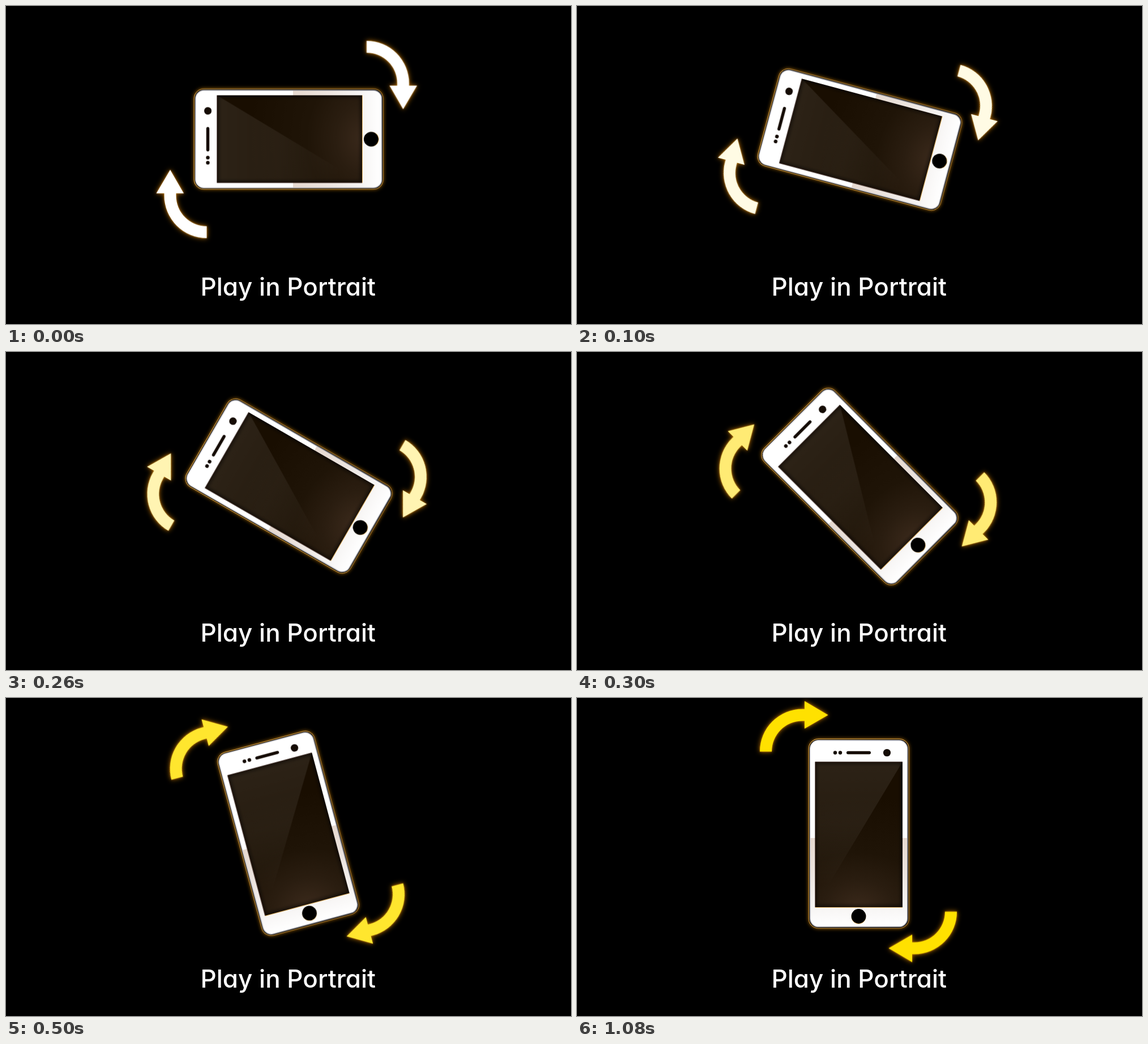
Write an HTML page that moves like this. It is 998x561 px and loops after 1.4 s.

```html
<!DOCTYPE html>
<html lang="en">
<head>
<meta charset="utf-8">
<title>Play in Portrait</title>
<style>
  html, body { margin: 0; width: 100%; height: 100%; overflow: hidden; background: #000; }
  svg { display: block; width: 100%; height: 100%; }
  #turner { transform-box: view-box; transform-origin: 496.25px 236.25px; }
  .arrow { filter: drop-shadow(0 0 1.5px #b87408) drop-shadow(0 0 4px #9a5e00); }
  .rim { filter: drop-shadow(0 0 3px #9a6000); }
  text {
    font: 450 44px Inter, "Open Sans", sans-serif;
    font-feature-settings: "cv11";
    text-anchor: middle;
    fill: #fff;
  }
</style>
</head>
<body>
<svg viewBox="0 0 998 561">
  <defs>
    <linearGradient id="casing" gradientUnits="userSpaceOnUse" x1="0" y1="75" x2="0" y2="403">
      <stop offset="0" stop-color="#fff"/>
      <stop offset=".524" stop-color="#fff"/>
      <stop offset=".524" stop-color="#e6d9d0"/>
      <stop offset=".7" stop-color="#ece4df"/>
      <stop offset=".9" stop-color="#f7f5f4"/>
      <stop offset="1" stop-color="#fff"/>
    </linearGradient>
    <linearGradient id="edge" x1="0" y1="0" x2="1" y2="1">
      <stop offset="0" stop-color="#dedbdc"/>
      <stop offset="1" stop-color="#85858d"/>
    </linearGradient>
    <linearGradient id="gold" x1="0" y1="0" x2="1" y2="1">
      <stop offset="0" stop-color="#dca850"/>
      <stop offset="1" stop-color="#b58234"/>
    </linearGradient>
    <radialGradient id="glass" gradientUnits="userSpaceOnUse" cx="498" cy="372" r="250"
                    gradientTransform="translate(0 74.4) scale(1 .8)">
      <stop offset="0" stop-color="#3a291b"/>
      <stop offset=".25" stop-color="#2a1d10"/>
      <stop offset=".5" stop-color="#1f1407"/>
      <stop offset="1" stop-color="#190e01"/>
    </radialGradient>
    <linearGradient id="gloss" gradientUnits="userSpaceOnUse" x1="0" y1="112" x2="0" y2="330">
      <stop offset="0" stop-color="#fff" stop-opacity=".085"/>
      <stop offset=".5" stop-color="#fff" stop-opacity=".06"/>
      <stop offset="1" stop-color="#fff" stop-opacity="0"/>
    </linearGradient>
    <filter id="soft"><feGaussianBlur stdDeviation="3"/></filter>
    <clipPath id="screen"><rect x="420.5" y="112.5" width="154.5" height="256.5"/></clipPath>
    <path id="arrow" d="M323 94.5A75 75 0 0 1 398 19.5H402V5.5L443.5 30L402 54V40.5H398A54 54 0 0 0 344 94.5Z"/>
  </defs>

  <g id="turner">
    <g id="arrows" fill="#fff">
      <use class="arrow" href="#arrow"/>
      <use class="arrow" href="#arrow" transform="rotate(180 497 235.75)"/>
    </g>

    <rect class="rim" x="409.4" y="72.4" width="176.8" height="333.8" rx="17" stroke="url(#gold)" stroke-width="1.1"/>
    <rect x="411.8" y="74.8" width="172" height="329" rx="15" fill="url(#casing)" stroke="url(#edge)" stroke-width="1.5"/>

    <g clip-path="url(#screen)">
      <rect x="420" y="112" width="156" height="258" fill="url(#glass)"/>
      <path d="M420.5 112.5H575L420.5 369Z" fill="url(#gloss)"/>
      <rect x="420.5" y="112.5" width="154.5" height="256.5" fill="none" stroke="#0c0600"
            stroke-opacity=".75" stroke-width="5" filter="url(#soft)"/>
    </g>
    <path d="M420.5 369.5H575" stroke="#e3b566"/>

    <g fill="#150c05">
      <circle cx="547.5" cy="96.5" r="6.6"/>
      <rect x="476" y="93.8" width="43" height="5.4" rx="2.7"/>
      <circle cx="465" cy="96.5" r="3.2"/>
      <circle cx="456" cy="96.5" r="3.2"/>
    </g>
    <circle cx="497.5" cy="385.8" r="12.9" fill="#e3b566"/>
    <circle cx="497.5" cy="385" r="12.9"/>
  </g>

  <text x="498.3" y="511">Play in Portrait</text>
</svg>
<script>
  const LOOP = 1400, STEP = 100;
  const tints = ['#ffffff', '#fffbe4', '#fff4b2', '#ffeb74', '#ffe752', '#ffe62e', '#ffe100'];

  // Holds every pose for one step; the last one stays until the loop ends.
  function playSteps(id, pose) {
    const frames = tints.map((tint, i) => ({ ...pose(i), offset: i * STEP / LOOP, easing: 'step-end' }));
    frames.push({ ...pose(tints.length - 1), offset: 1 });
    document.getElementById(id).animate(frames, { duration: LOOP, iterations: Infinity });
  }

  playSteps('turner', i => ({ transform: `rotate(${15 * i - 90}deg)` }));
  playSteps('arrows', i => ({ fill: tints[i] }));
</script>
</body>
</html>
```
